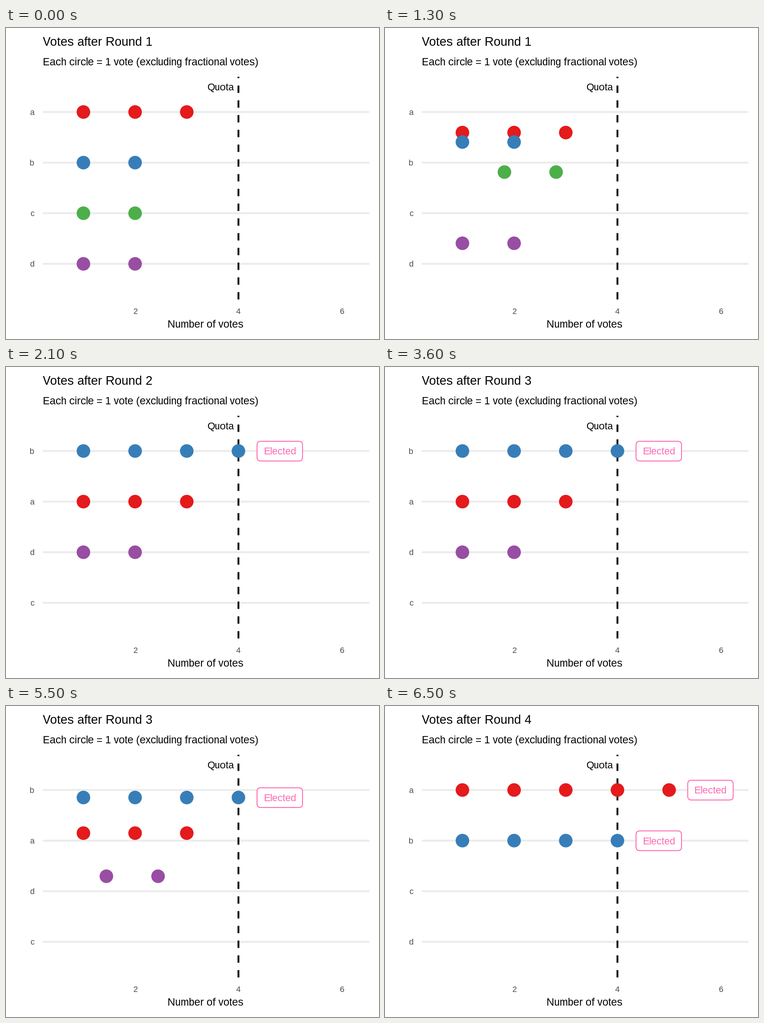
These frames come from a looping animation (820x683 px, 8000 ms). A matplotlib script:

```python
import matplotlib.pyplot as plt
from matplotlib.animation import FuncAnimation
from matplotlib.patches import Circle, FancyBboxPatch

W, H, DPI = 820, 683, 64  # a power of two keeps the pixel size exact
PT = 72 / DPI  # points per pixel
FRAMES, INTERVAL = 80, 100
HOLD, MOVE = 7, 15
STEP = HOLD + MOVE

COLORS = {"a": "#E41A1C", "b": "#377EB8", "c": "#4DAF4A", "d": "#984EA3"}
PINK = "#FF69B4"
ORDERS = ["abcd", "badc", "badc", "abcd"]

# Candidate and column of every vote in each round
VOTES = [path.split() for path in (
    "a1 a1 a1 a1", "a2 a2 a2 a2", "a3 a3 a3 a3",
    "b1 b1 b1 b1", "b2 b2 b2 b2",
    "c1 b3 b3 b3", "c2 b4 b4 b4",
    "d1 d1 d1 a4", "d2 d2 d2 a5",
)]
# Candidate: first round shown as elected, column in each round
ELECTED = {"a": (4, (2, 2, 2, 5)), "b": (2, (2, 4, 4, 4))}
TAG_W, TAG_H = 100, 43.3

plt.rcParams.update({
    "font.family": "Liberation Sans",
    "text.hinting": "native",
    "text.hinting_factor": 1,
})

fig = plt.figure(figsize=(W / DPI, H / DPI), dpi=DPI, facecolor="white")
ax = fig.add_axes([0, 0, 1, 1])
ax.set(xlim=(0, W), ylim=(H, 0))
ax.axis("off")


def col_x(col):
    return 56.6 + 113.6 * col


def row_y(row):
    return 184.5 + 111.15 * row


def ease(t):
    return 4 * t**3 if t < 0.5 else 1 - 4 * (1 - t)**3


def write(x, y, text, size, color="black", ha="left", z=3):
    return ax.text(x, y, text, size=size * PT, color=color, ha=ha,
                   va="baseline", zorder=z)


def rule(xs, ys, color, z, **style):
    ax.plot(xs, ys, color=color, lw=4.05 * PT, zorder=z, snap=False, **style)


title = write(81, 39, "", 27.4)
write(81, 82, "Each circle = 1 vote (excluding fractional votes)", 23.05)
write(355, 658, "Number of votes", 23.05)
write(443, 137, "Quota", 21.6)
for col in (2, 4, 6):
    write(col_x(col) - 5, 628, str(col), 18.25, "#4D4D4D")

names = []
for row in range(4):
    y = row_y(row)
    rule([81, 799], [y, y], "#EBEBEB", 0, solid_capstyle="butt")
    names.append(write(62, y + 6.5, "", 18.25, "#4D4D4D", "right"))
rule([col_x(4)] * 2, [596.2, 107], "black", 1, linestyle=(0, (4, 4)))

dots = [ax.add_patch(Circle((0, 0), 14.9, lw=0, zorder=4)) for _ in VOTES]
tags = {}
for i, name in enumerate(ELECTED):
    box = FancyBboxPatch((0, 0), TAG_W, TAG_H, fc="white", ec=PINK,
                         boxstyle="round,pad=0,rounding_size=8",
                         lw=2 * PT, snap=False, zorder=5 + 2 * i)
    ax.add_patch(box)
    tags[name] = box, write(0, 0, "Elected", 21.6, PINK, z=6 + 2 * i)


def update(k):
    now, step = divmod(k, STEP)
    nxt = min(now + 1, 3)
    t = max(0, step - HOLD + 1) / MOVE if now < 3 else 0
    p = ease(t)
    shown = nxt if t > 0.5 else now

    def mix(a, b):
        return a + (b - a) * p

    def place(col0, col1, name0, name1):
        rows = ORDERS[now].index(name0), ORDERS[nxt].index(name1)
        return col_x(mix(col0, col1)), row_y(mix(*rows))

    title.set_text(f"Votes after Round {shown + 1}")
    for label, name in zip(names, ORDERS[shown]):
        label.set_text(name)

    for dot, path in zip(dots, VOTES):
        (n0, c0), (n1, c1) = path[now], path[nxt]
        dot.center = place(int(c0), int(c1), n0, n1)
        dot.set_facecolor(COLORS[path[shown][0]])

    for name, (first, cols) in ELECTED.items():
        x, y = place(cols[now] + 0.8, cols[nxt] + 0.8, name, name)
        box, text = tags[name]
        box.set_bounds(x - TAG_W / 2, y + 0.3 - TAG_H / 2, TAG_W, TAG_H)
        text.set_position((x - 36, y + 7.95))
        for part in (box, text):
            part.set_visible(shown + 1 >= first)


anim = FuncAnimation(fig, update, frames=FRAMES, interval=INTERVAL,
                     init_func=lambda: update(0), repeat=True,
                     repeat_delay=0)
plt.show()
```
